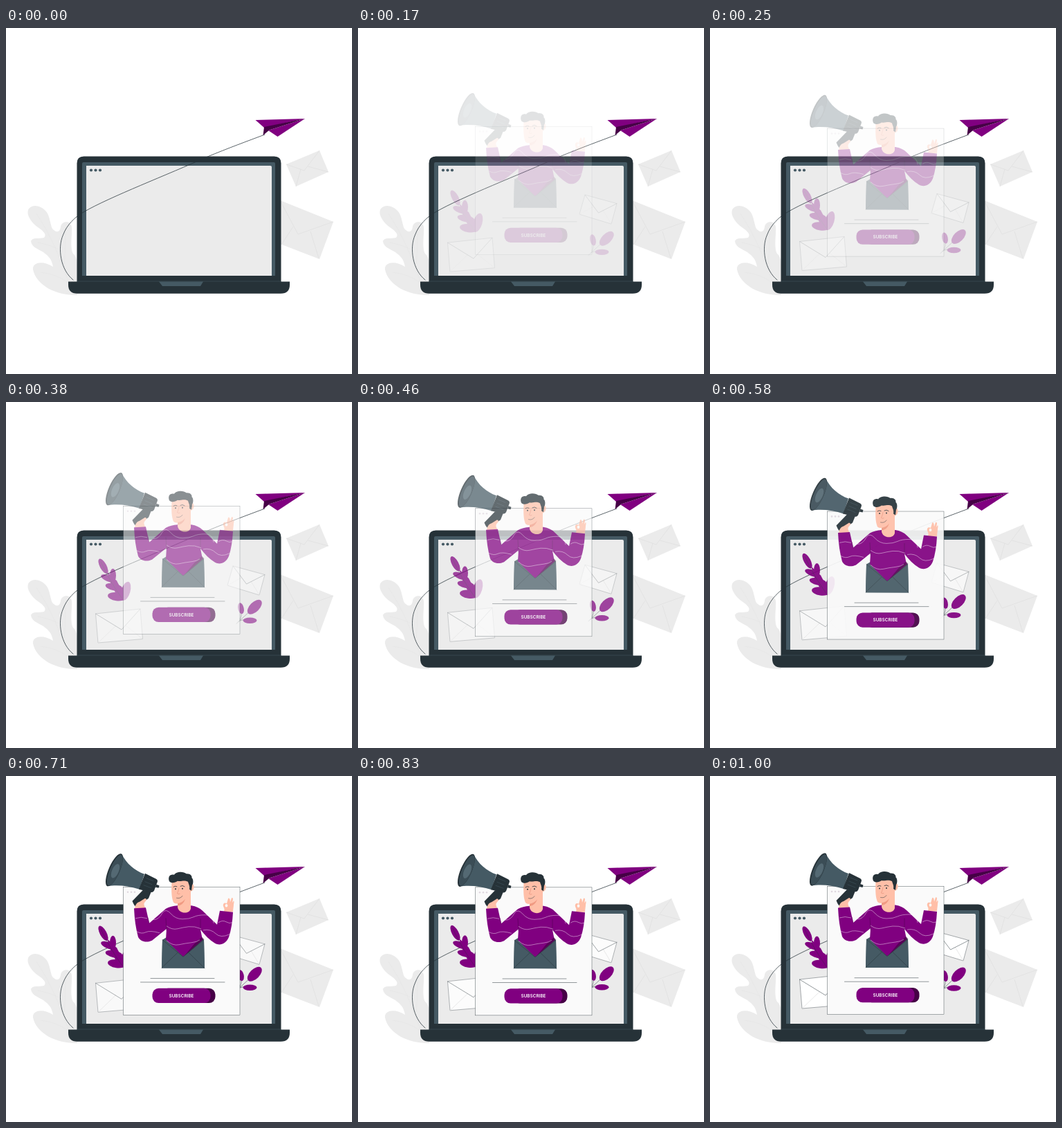
Write an HTML page that moves like this. It is 500 by 500 pixels and loops after 1.04 s.

```html
<!DOCTYPE html>
<html lang="en">
<head>
<meta charset="utf-8">
<title>Subscribe</title>
<style>
  html, body { margin: 0; width: 100%; height: 100%; overflow: hidden; background: #fff; }
  svg { display: block; width: 100vw; height: 100vh; }
  .ink { fill: #263238; }
  .slate { fill: #455a64; }
  .pale { fill: #ebebeb; }
  .plum { fill: #800080; }
  .deep { fill: #460046; }
  .skin { fill: #ffbfa8; }
  .line { fill: none; stroke: #263238; stroke-width: .5; stroke-linecap: round; stroke-linejoin: round; }
  .crease { fill: none; stroke: #dedede; stroke-width: .7; }
  .paper { fill: #fff; stroke: #263238; stroke-width: .4; }
  .wave { fill: none; stroke: #fff; stroke-width: .55; opacity: .8; }
  text { font: 600 6.4px Inter, "Liberation Sans", sans-serif; fill: #fff; text-anchor: middle; }
</style>
</head>
<body>
<svg viewBox="0 0 500 500">
  <!-- backdrop -->
  <g>
    <path class="pale" d="M100 386C72 386 44 372 39 349C38 338 54 336 68 345C66 334 62 330 54 324C46 319 37 317 36 308C38 302 48 305 55 303C60 298 52 292 46 288C36 281 28 268 33 261C40 253 54 258 60 268C64 276 64 284 67 290C72 296 78 296 79 287C81 278 94 278 95 288C96 296 92 318 97 326C101 330 103 334 103 345V386Z"/>
    <path class="crease" style="stroke:#e5e5e5" d="M44 268Q72 310 92 372M46 310Q66 314 76 320M86 288Q86 320 84 342M50 353Q74 356 90 368"/>
    <path class="pale" d="M405 197L453 177L466 208L419 229Z"/>
    <path class="crease" d="M405 197L431 206L453 177M419 229L426 204M466 208L436 200"/>
    <path class="pale" d="M396 249L473 280L453 334L396 312Z"/>
    <path class="crease" d="M397 251L422 298L473 280M398 313L415 287M452 333L440 294"/>
  </g>

  <!-- laptop -->
  <path class="ink" d="M102.500 367V195.500Q102.500 185.500 112.500 185.500H387.500Q397.500 185.500 397.500 195.500V367Z"/>
  <path class="slate" d="M110 366V196Q110 194 112 194H387Q389 194 389 196V366Z"/>
  <path class="ink" d="M110 358H389V366H110Z"/>
  <path class="pale" d="M116 358V199H382Q384 199 384 201V358Z"/>
  <g class="slate">
    <circle cx="123" cy="205.5" r="2.1"/><circle cx="129.5" cy="205.5" r="2.1"/><circle cx="136" cy="205.5" r="2.1"/>
  </g>
  <path class="ink" d="M90 366.500H410V371Q410 383.800 397 383.800H103Q90 383.800 90 371Z"/>
  <path class="line" style="stroke:#455a64" d="M103 366H397"/>
  <path class="slate" d="M221 366.500H285L281 373H226Z"/>

  <!-- paper plane -->
  <path class="line" style="stroke-width:.75" d="M97 364C79 350 74 318 82.500 299C88 284 100 273 112 266C150 244 235 211.500 290 186.500C320 174 350 163 374 154"/>
  <path class="plum" d="M360.500 133L432 131L373 144Z"/>
  <path class="plum" d="M432 131L392.500 157L379 148Z"/>
  <path class="deep" d="M373 143L432 131L380.500 147.500L371.500 155Z"/>

  <!-- purple plants -->
  <g id="plants">
    <g class="plum">
      <ellipse cx="140.500" cy="228" rx="4.800" ry="12" transform="rotate(-28 140.500 228)"/>
      <ellipse cx="154.500" cy="241.500" rx="4.500" ry="10"/>
      <ellipse cx="147.500" cy="245.500" rx="11" ry="4.500" transform="rotate(22 147.500 245.500)"/>
      <ellipse cx="156" cy="258" rx="12.500" ry="5" transform="rotate(12 156 258)"/>
      <ellipse cx="173" cy="264" rx="6.500" ry="14" transform="rotate(16 173 264)"/>
      <ellipse cx="160" cy="272" rx="13" ry="6" transform="rotate(8 160 272)"/>
      <path d="M146 236L160 249L172 272L160 270L151 252Z"/>
    </g>
    <path class="line" style="stroke-width:.35" d="M137 222Q150 250 168 275"/>
    <path class="line" d="M333 311Q345 300 358 288M338 306Q341 300 340 293M336 308Q342 304 350 306"/>
    <ellipse class="plum" cx="339.500" cy="289" rx="4.200" ry="8.200" transform="rotate(-12 339.500 289)"/>
    <ellipse class="plum" cx="359.300" cy="287" rx="13" ry="7" transform="rotate(-45 359.300 287)"/>
    <ellipse class="plum" cx="352.500" cy="306.500" rx="10" ry="4.200"/>
  </g>

  <!-- white envelopes -->
  <g id="mail">
    <path class="paper" d="M129.500 294L194 287L197.500 330.500L133 336Z"/>
    <path class="crease" d="M133 336L159 311M197.500 330.500L173 311"/>
    <path class="line" d="M129.500 294L167 317L194 287"/>
    <path class="paper" d="M328 225L374 237.500L366 267L320 253Z"/>
    <path class="crease" d="M320 253L340 242M366 267L354 247"/>
    <path class="line" d="M328 225L347.500 251L374 237.500"/>
  </g>

  <!-- window -->
  <g id="panel">
    <rect class="paper" style="fill:#fafafa" x="169.500" y="159.600" width="168.500" height="185"/>
    <g fill="#e0d8e0">
      <circle cx="176" cy="167" r="1.300"/><circle cx="181" cy="167" r="1.300"/><circle cx="186" cy="167" r="1.300"/>
    </g>
    <path class="line" d="M209 291.700H301M194.500 297.200H316"/>
    <rect class="deep" x="225" y="306" width="77.500" height="21.300" rx="9"/>
    <rect class="plum" x="211.500" y="306" width="84" height="21.300" rx="9"/>
    <text x="253.500" y="318.900">SUBSCRIBE</text>
  </g>

  <!-- speaker -->
  <g id="man">
    <path class="slate" d="M226 236L236 230H277L286 236L287 277H225Z"/>

    <path class="ink" d="M198 164L210 166L206 176L189 188Q186 189 182.500 180Z"/>
    <path class="slate" d="M167 111.500C174 126 186 136 200 141L193 163C178 158 160 156 147 158.500Z"/>
    <ellipse class="ink" cx="156.500" cy="135" rx="8" ry="25.500" transform="rotate(23.500 156.500 135)"/>
    <ellipse fill="#3b4d56" cx="157.300" cy="135.300" rx="7" ry="24" transform="rotate(23.500 157.300 135.300)"/>
    <ellipse fill="#546973" cx="158" cy="136.500" rx="4.800" ry="11" transform="rotate(23.500 158 136.500)"/>
    <path class="ink" d="M201 140L217 148Q220 150 218.500 153L214 165Q212 168 209 167L192 163Z"/>
    <path class="ink" d="M217 156L221.500 157.500L220.500 161L216 160Z"/>
    <path class="line" style="stroke:#455a64" d="M203 147L213 151M201 152L211 156M199 157L210 161"/>
    <path class="skin" d="M186 191C187 185 189 182 193 181L201 176Q205 177 201 181C198 184 200 187 202 191Z"/>

    <path class="skin" transform="translate(0 1.500)" d="M314 194C317 191 315 189 314 186C313 182 316 180 319 182L321 175Q322 173 323.500 176L324 180L326 174Q328 173 328 176L327 181L329 178Q330 179 329 183C329 187 328 190 328 194Z"/>
    <ellipse cx="318.500" cy="186.500" rx="1.800" ry="2.200" fill="#fafafa"/>

    <path class="plum" d="M185 190.500L202 189.500L207 212L231 191Q238 187 248 186.500H268Q278 188 284 194L305 214L309 194L328 196Q327 217 322 232C318 242 309 245 302 241C294 236 287 229 281 221L284 236L256 260.500L231 236L232 220L211 237C202 241 194 238 191 232Q186 214 185 190.500Z"/>
    <path class="deep" style="opacity:.7" d="M286 235L257 260L272 242L283 232Z"/>
    <path class="line" style="stroke:#4a004a" d="M207 212Q206 208 205 204M231 205L232 222M281 206L281 221"/>
    <path class="wave" d="M187 205Q195 202 204 205M213 207Q221 207 226 197Q231 190 238 198T255 206T271 203T288 200T300 212M189 224Q196 228 202 225T222 226M232 216Q240 222 248 220T264 217T282 220M232 237Q241 245 250 243T268 240T280 236M307 211Q313 207 318 210T327 211M285 222Q296 220 303 227T323 228"/>

    <path class="skin" d="M239.500 152C239 163 239 172 241 179Q242 184.500 248 183.500V188C248 197 264 201 267 191V166C273 165 273 154 268 155L266 147L244 147Z"/>
    <path fill="#f09a82" d="M248 183.500Q255 182 259 177Q256 186 248 187Z"/>
    <path class="ink" d="M236 151.500C233.500 145 237 140.500 243 142C246 137 257 137 260.500 140.500C267 140 269 144 268.500 146.500C271 148 271 155 269 157L268 165L265 163C266 158 264 156 263 152C257 149 254 152 248 151C244 154 239 154.500 236 151.500Z"/>
    <circle class="ink" cx="245" cy="162.500" r="1"/><circle class="ink" cx="255" cy="162" r="1"/>
    <path class="line" style="stroke-width:.8" d="M242 159.500Q244 157.500 247 159M252 158.500Q255 156.500 258 159"/>
    <path class="line" style="stroke:#d97f68" d="M250 161Q249 166 247.500 169Q249 170.500 251 169.500"/>
    <path class="line" d="M246.500 175.500Q252 177 255 172.500"/>

    <path class="slate" d="M226 236L256 260.500L286 236L287 277L225 276.500Z"/>
    <path class="line" d="M225 276.500L248 254.500M287 277L264 254.500M226 236L256 260.500L286 236"/>
  </g>
</svg>
<script>
  const LOOP = 1040, STEP = 1000 / 24, RISE = 20;
  const $ = id => document.getElementById(id);
  const plants = $("plants"), mail = $("mail"), panel = $("panel"), man = $("man");

  const bez = (s, a, b) => 3 * (1 - s) ** 2 * s * a + 3 * (1 - s) * s * s * b + s ** 3;

  // cubic-bezier(.36, -.01, .5, 1.38): overshoots, then settles
  function ease(x) {
    let lo = 0, hi = 1;
    for (let k = 0; k < 24; k++) {
      const mid = (lo + hi) / 2;
      if (bez(mid, .36, .5) < x) lo = mid; else hi = mid;
    }
    return bez(lo, -.01, 1.38);
  }

  function place(el, progress, from) {
    el.setAttribute("transform", `translate(0 ${(from * (1 - progress)).toFixed(3)})`);
    el.setAttribute("opacity", Math.max(0, Math.min(1, progress)));
  }

  function draw(now) {
    const tick = Math.floor((now % LOOP + 5) / STEP);
    const x = tick < 2 ? 0 : Math.min(1, tick / 24 + .025);
    const p = x === 1 ? 1 : ease(x) * (x > 0);
    place(plants, p, RISE);
    place(mail, x, RISE);
    place(panel, p, -RISE);
    place(man, p, -RISE);
  }

  const start = performance.now();
  function loop() {
    draw(performance.now() - start);
    requestAnimationFrame(loop);
  }
  loop();
</script>
</body>
</html>
```
